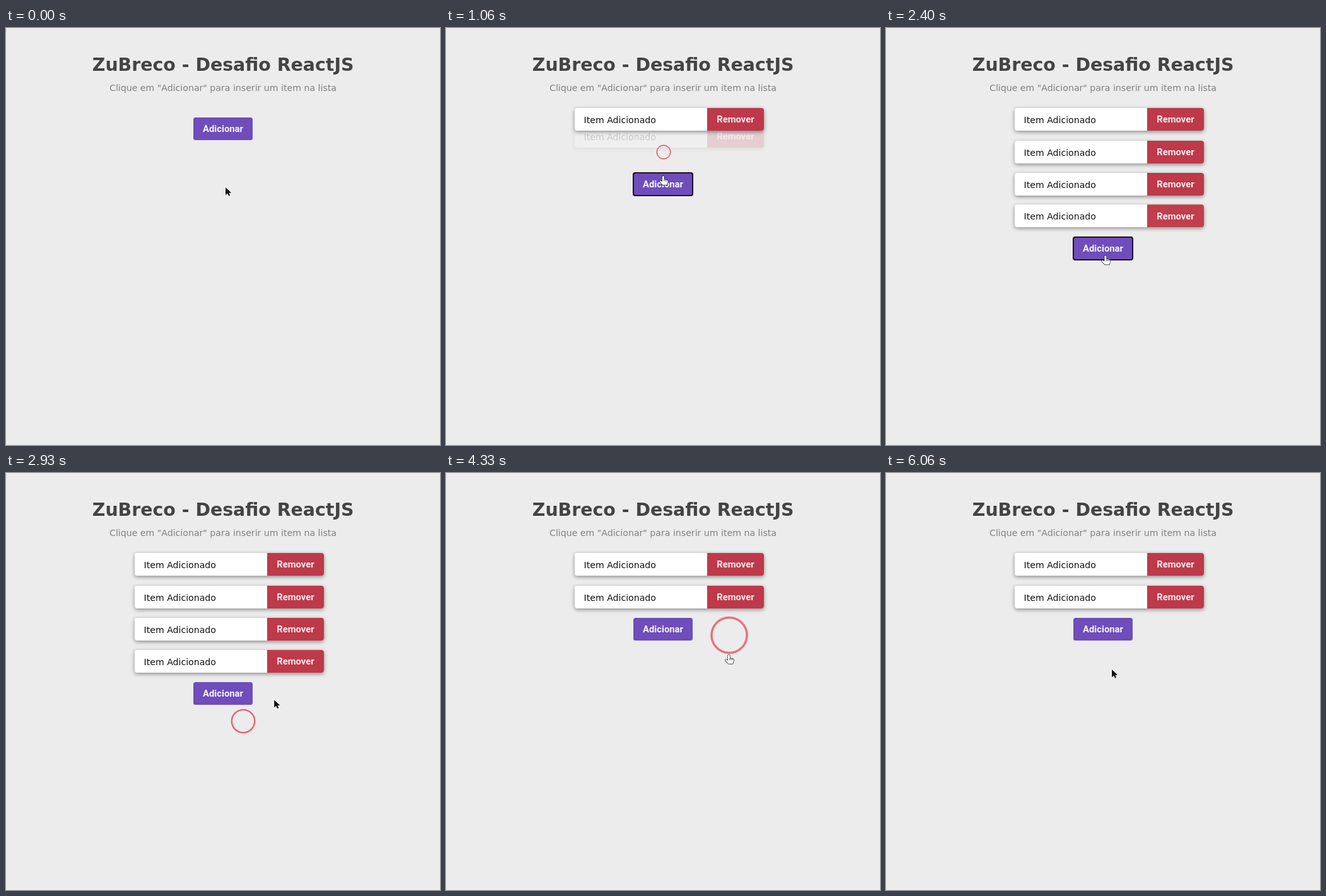
An HTML page with a canvas that plays this animation: 688 px wide and 662 px high, repeating every 6130 ms.

```html
<!DOCTYPE html>
<html lang="pt-BR">
<head>
<meta charset="utf-8">
<title>Desafio ReactJS</title>
<style>
  html, body { margin: 0; width: 100%; height: 100%; overflow: hidden; background: #ececec; }
  canvas { display: block; }
</style>
</head>
<body>
<canvas id="stage" width="688" height="662"></canvas>
<script>
const ctx = document.getElementById('stage').getContext('2d');

const LOOP = 6130, STEP = 200 / 3;
const ENTER = 400, RING = 300;
const HEIGHT = 36;
const SANS = '"DejaVu Sans", sans-serif';
const BUTTON_FONT = 'bold 14.8px Roboto, sans-serif';

// Stops of the pointer: time, x, y, and what it clicks there
const stops = [
  [0, 348, 253],
  [430, 345, 163, 'add'],
  [964, 345, 197, 'add'],
  [1496, 344, 262, 'add'],
  [2036, 343, 312, 'add'],
  [2400, 348, 361],
  [2760, 376, 394, 'blank'],
  [3533, 453, 341],
  [3800, 456, 299, 'remove'],
  [4066, 449, 257.5, 'remove'],
  [4333, 449, 288],
  [4660, 363, 330],
  [5600, 363, 330],
  [LOOP, 358, 312]
];
const clicks = stops.filter(stop => stop[3]);

const arrow = new Path2D('M0 0V12.4L3 9.6 5 13.8 7.2 12.8 5.3 8.8H9.4Z');
const hand = new Path2D('M-1.6 1.3Q0 -.9 1.3 1.3V5.8L6.3 7Q7.8 7.6 7.4 9.2L6 14.6H-1L-5.8 9.6Q-6 7.4 -4 8L-1.6 9.4Z');
const fingers = new Path2D('M1.3 6V9M3.3 6.8V9M5.3 7.2V9');

const rowTop = i => Math.round(127.3 + 51.2 * i);
const buttonTop = count => count ? rowTop(count) : 142;
const inside = (value, start, size) => value >= start && value <= start + size;

// Times at which the listed items were added
function itemsAt(t) {
  const items = [];
  for (const [time, , , action] of clicks) {
    if (time > t) break;
    if (action === 'add') items.push(time);
    if (action === 'remove') items.pop();
  }
  return items;
}

function pointerAt(t) {
  const i = stops.findIndex(stop => stop[0] > t);
  const [t0, x0, y0] = stops[i - 1], [t1, x1, y1] = stops[i];
  const p = 1 - (1 - (t - t0) / (t1 - t0)) ** 4;
  return [x0 + (x1 - x0) * p, y0 + (y1 - y0) * p];
}

// The pointer shape reacts late to changes of the layout
function isOverButton(x, y, t) {
  if (inside(x, 297, 94)) return inside(y, buttonTop(itemsAt(t - 100).length), HEIGHT);
  return inside(x, 414, 90) && itemsAt(t - 540).some((_, i) => inside(y, rowTop(i), HEIGHT));
}

function text(str, x, y, font, color, align = 'center') {
  ctx.font = font;
  ctx.fillStyle = color;
  ctx.textAlign = align;
  ctx.fillText(str, x, y);
}

function box(x, y, w, h, radius, color) {
  ctx.fillStyle = color;
  ctx.beginPath();
  ctx.roundRect(x, y, w, h, radius);
  ctx.fill();
}

function drawItem(index, age) {
  const p = Math.min(1, age / ENTER), shown = p * p * (3 - 2 * p);
  const y = rowTop(index) - 30 * (1 - shown);
  ctx.save();
  ctx.shadowColor = 'rgba(0,0,0,.42)';
  ctx.shadowBlur = 6;
  ctx.shadowOffsetY = 2;
  box(204, y, 300, HEIGHT, 4, '#fff');
  ctx.restore();
  box(414, y, 90, HEIGHT, [0, 4, 4, 0], '#be3949');
  text('Item Adicionado', 218.6, y + 24, '14.1px ' + SANS, '#111', 'left');
  text('Remover', 459, y + 23.4, BUTTON_FONT, '#f8eef0');
  // Fade in by lifting a veil of the page colour
  box(190, y - 10, 330, HEIGHT + 22, 0, `rgba(236,236,236,${1 - shown})`);
}

function drawButton(count, focused) {
  const y = buttonTop(count);
  if (focused) box(296, y - 1, 96, HEIGHT + 2, 4, '#0c0716');
  const inset = focused ? .7 : 0;
  box(297 + inset, y + inset, 94 - 2 * inset, HEIGHT - 2 * inset, 3.5, '#6f4dbb');
  text('Adicionar', 344, y + 23.4, BUTTON_FONT, '#f8f5ff');
}

function drawRing(x, y, age) {
  if (age < 0 || age >= RING) return;
  const radius = age * .105;
  ctx.strokeStyle = `rgba(228,55,75,${1 - age / 800})`;
  ctx.lineWidth = radius / 8;
  ctx.beginPath();
  ctx.arc(x, y, radius, 0, 2 * Math.PI);
  ctx.stroke();
}

function drawPointer(t) {
  const [x, y] = pointerAt(t);
  const isHand = isOverButton(x, y, t), shape = isHand ? hand : arrow;
  ctx.save();
  ctx.translate(x, y);
  ctx.lineJoin = 'round';
  ctx.lineWidth = 1.3;
  ctx.strokeStyle = isHand ? '#111' : '#fff';
  ctx.fillStyle = isHand ? '#fff' : '#111';
  ctx.stroke(shape);
  ctx.fill(shape);
  ctx.lineWidth = .7;
  if (isHand) ctx.stroke(fingers);
  ctx.restore();
}

function draw(t) {
  box(0, 0, 688, 662, 0, '#ececec');
  text('ZuBreco - Desafio ReactJS', 551.4, 68, 'bold 28.4px ' + SANS, '#444', 'right');
  text('Clique em "Adicionar" para inserir um item na lista', 344, 100, '14.13px ' + SANS, '#808080');

  const items = itemsAt(t);
  for (let i = items.length - 1; i >= 0; i--) drawItem(i, t - items[i]);
  const lastClick = clicks.findLast(([time]) => time <= t);
  drawButton(items.length, lastClick?.[3] === 'add');
  for (const [time, x, y] of clicks) drawRing(x, y, t - time);
  drawPointer(t);
}

function tick() {
  const t = performance.now() % LOOP;
  draw(Math.min(LOOP - 1, Math.floor((t + 7) / STEP) * STEP));
  requestAnimationFrame(tick);
}
tick();
</script>
</body>
</html>
```
